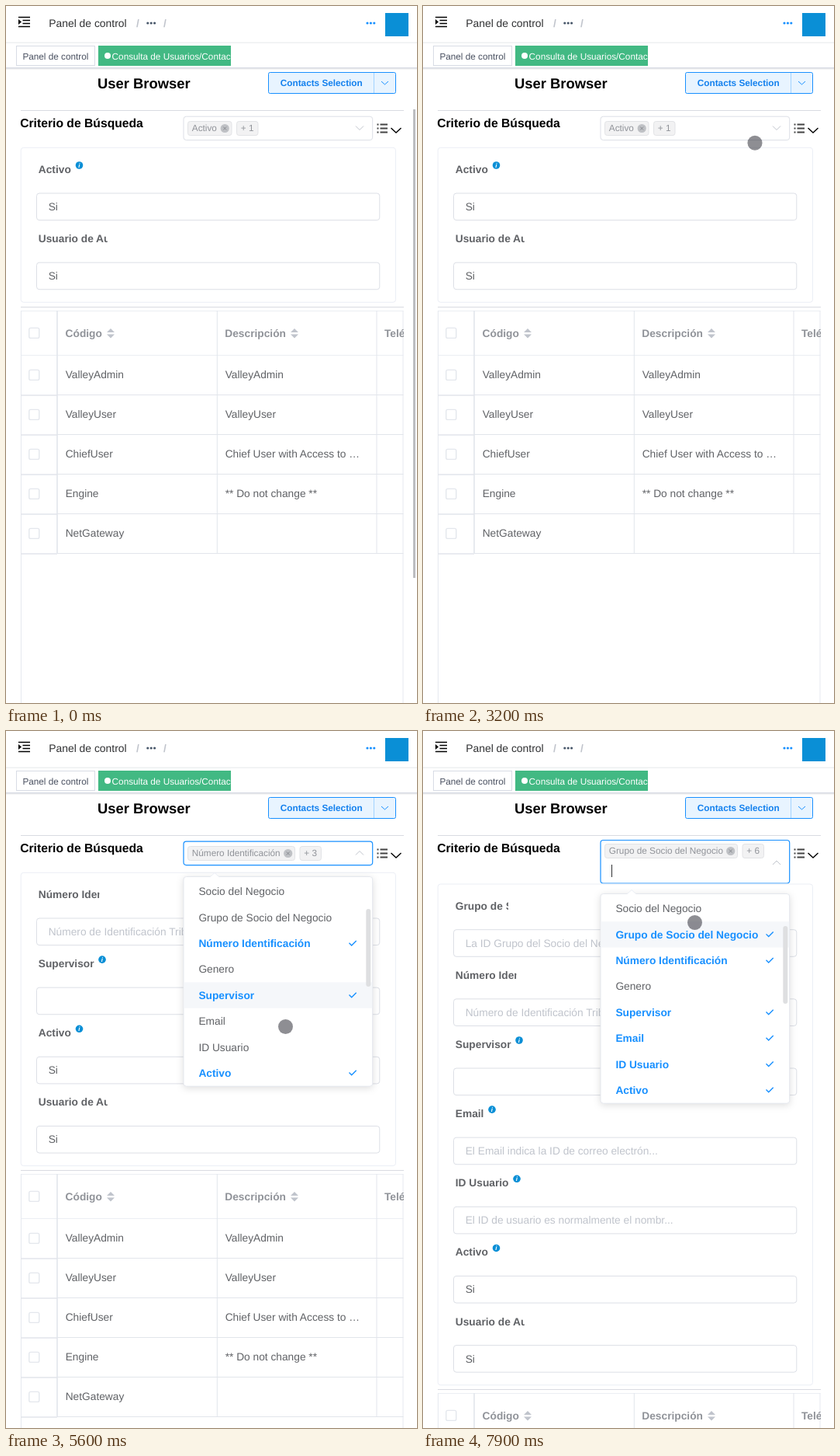
These frames come from a looping animation (530x897 px, 8 s). An HTML page:

```html
<!DOCTYPE html>
<html lang="es">
<head>
<meta charset="utf-8">
<title>User Browser</title>
<style>
  html, body { margin: 0; width: 100%; height: 100%; overflow: hidden; background: #fff; }
  #stage { display: block; width: 530px; height: 897px; }
  text { font-family: "Liberation Sans", Arial, sans-serif; text-rendering: geometricPrecision; white-space: pre; }
  .menu { filter: drop-shadow(0 2px 5px rgba(0, 0, 0, .13)); }
</style>
</head>
<body>
<svg id="stage" viewBox="0 0 530 897"></svg>
<script>
const LOOP = 8000, STEP = 100;
const BLUE = '#1890ff', GRAY = '#606266', MUTED = '#909399', PALE = '#c0c4cc', EDGE = '#dcdfe6', LINE = '#e2e5eb';
const BODY = 13.74, SMALL = 11.78;
const FIELD_PITCH = 89.15, OPTION_PITCH = 33.37;
const OPEN_AT = 3400;

// Form fields in order; "at" is the moment each one is picked in the menu.
const fields = [
  { name: 'Grupo de Socio del Negocio', at: 7800, clip: 68.5, tag: 172, hint: 'La ID Grupo del Socio del Negocio' },
  { name: 'Número Identificación', at: 4500, clip: 79, tag: 139, hint: 'Número de Identificación Tributaria' },
  { name: 'Supervisor', at: 5100, tip: 124, hint: '' },
  { name: 'Email', at: 5800, tip: 89, hint: 'El Email indica la ID de correo electrón...' },
  { name: 'ID Usuario', at: 6600, tip: 121, hint: 'El ID de usuario es normalmente el nombr...' },
  { name: 'Activo', at: 0, tip: 94.5, tag: 57.5, value: 'Si' },
  { name: 'Usuario de Auditoría', at: 0, clip: 89.5, value: 'Si' }
];
const options = ['Socio del Negocio', 'Grupo de Socio del Negocio', 'Número Identificación', 'Genero',
  'Supervisor', 'Email', 'ID Usuario', 'Activo'];
const rows = [
  ['ValleyAdmin', 'ValleyAdmin'], ['ValleyUser', 'ValleyUser'],
  ['ChiefUser', 'Chief User with Access to …'], ['Engine', '** Do not change **'], ['NetGateway', '']
];

const pointerPath = [
  [500, 482, 261], [600, 447, 231], [700, 423.5, 241.5], [2900, 423.5, 241.5],
  [3000, 435, 190], [3300, 424.5, 169.5], [3900, 424.5, 169.5], [4300, 358, 275],
  [4500, 358, 275], [4900, 360, 342], [5100, 360, 342], [5600, 360.5, 380.5],
  [5800, 360.5, 380.5], [6300, 366, 402], [6900, 366, 402], [7000, 365.5, 351.5],
  [7300, 352, 272], [7600, 350.5, 246.5]
];
const scrollPath = [[1200, 0], [1300, 51], [1400, 90], [1500, 104], [1700, 104], [1800, 53], [1900, 14], [2000, 0]];
const thumbFade = [[2200, 1], [2300, .6], [2400, .2], [2600, .2], [2700, 0]];

function sample(keys, t) {
  const next = keys.findIndex(k => k[0] > t);
  if (next < 0) return keys[keys.length - 1].slice(1);
  if (next === 0) return keys[0].slice(1);
  const a = keys[next - 1], b = keys[next], p = (t - a[0]) / (b[0] - a[0]);
  return a.slice(1).map((v, i) => v + (b[i + 1] - v) * p);
}

const text = (x, y, s, fill = GRAY, size = BODY, bold = false) =>
  `<text x="${x}" y="${y}" fill="${fill}" font-size="${size}"${bold ? ' font-weight="bold"' : ''}>${s}</text>`;
const rect = (x, y, w, h, fill, stroke = 'none', r = 0, sw = 1) =>
  `<rect x="${x}" y="${y}" width="${w}" height="${h}" rx="${r}" fill="${fill}" stroke="${stroke}" stroke-width="${sw}"/>`;
const path = (d, stroke, w = 1, fill = 'none') => `<path d="${d}" stroke="${stroke}" stroke-width="${w}" fill="${fill}"/>`;
const circle = (x, y, r, fill) => `<circle cx="${x}" cy="${y}" r="${r}" fill="${fill}"/>`;
const dots = (x, y, gap, r, fill) => [0, 1, 2].map(i => circle(x + i * gap, y, r, fill)).join('');
const clip = (x, y, w, h, inner) =>
  `<svg x="${x}" y="${y}" width="${w}" height="${h}" viewBox="${x} ${y} ${w} ${h}">${inner}</svg>`;

function header() {
  return path('M16 14.5H31M21.5 18.5H31M21.5 22.5H31M16 26.5H31', '#000', 1.5) +
    path('M16 17L20 20.5L16 24Z', 'none', 0, '#000') +
    text(55.2, 27, 'Panel de control', '#303133', 13.9) +
    text(168, 27, '/', PALE, BODY, true) + text(203, 27, '/', PALE, BODY, true) +
    dots(182.8, 22, 4.4, 1.6, '#48576a') + dots(466, 22, 4.4, 1.6, BLUE) +
    rect(489, 9, 30, 30, '#0a8fd6') +
    rect(0, 46.5, 530, 1.5, '#eef0f2') +
    rect(0, 79, 530, 1, '#d8dce5') + rect(0, 80, 530, 1, '#e4e5e8') + rect(0, 81, 530, 1, '#f4f4f5') +
    rect(13.5, 51.5, 101, 25, '#fff', '#d8dce5') + text(21.4, 69, 'Panel de control', '#495060', SMALL) +
    rect(119, 51, 171, 26, '#42b983') + circle(131, 64, 4, '#fff') +
    clip(119, 51, 171, 26, text(136.6, 69, 'Consulta de Usuarios/Contactos', '#fff', SMALL)) +
    text(118, 106.3, 'User Browser', '#000', 18.4, true) +
    rect(338.5, 85.5, 164, 27, '#e8f4ff', BLUE, 2) + path('M474.5 86V112', '#a3d3ff') +
    text(353.8, 103, 'Contacts Selection', '#1380ee', SMALL, true) +
    path('M484 97L488.5 101L493 97', BLUE);
}

function tagBox(x, y, w, label) {
  return rect(x + .5, y + .5, w - 1, 18, '#f2f2f3', '#e2e3e6', 3) + text(x + 5.8, y + 13.3, label, MUTED, SMALL);
}

function select(picked, open, tall, caret) {
  const first = picked[0], tagY = tall ? 145 : 148, y = tagY + 9.5;
  const closeX = 234 + first.tag - 9.3, moreX = 234 + first.tag + 5.5;
  const caretX = tall ? 243.5 : moreX + 43.5, caretY = tall ? 172 : 149, arrowY = tall ? 169.5 : 157;
  const bend = open ? -2.5 : 2.5;
  return rect(229, tall ? 140.5 : 142.2, 243.7, tall ? 55.5 : 30.4, '#fff', open ? BLUE : EDGE, 3.5, open ? 1.2 : 1) +
    tagBox(234, tagY, first.tag, first.name) + circle(closeX, y, 5.6, '#bfc1c5') +
    path(`M${closeX - 2} ${y - 2}l4 4m0 -4l-4 4`, '#85888e') +
    tagBox(moreX, tagY, 28.5, '+ ' + (picked.length - 1)) +
    path(`M451 ${arrowY - bend}L456 ${arrowY + bend}L461 ${arrowY - bend}`, PALE) +
    (caret ? path(`M${caretX} ${caretY}v16`, '#303133') : '');
}

function field(f, y) {
  const label = text(41.8, y + 33, f.name, GRAY, BODY, true);
  return (f.clip ? clip(41.5, y + 18, f.clip, 22, label) : label) +
    (f.tip ? circle(f.tip, y + 23, 4.8, '#0a8fd6') +
      `<text x="${f.tip - 1.3}" y="${y + 26}" fill="#fff" font-size="8" font-weight="bold" font-style="italic">i</text>` : '') +
    rect(39.5, y + 59, 442.3, 34.6, '#fff', EDGE, 3.5) +
    text(54.7, y + 81, f.value || f.hint, f.value ? GRAY : PALE);
}

function table(top) {
  const box = y => rect(29.8, y - 6.6, 13, 13, '#fff', '#e4e7ed', 2, 1.4);
  const sorter = x => path(`M${x - 5} ${top + 28}h10l-5 -5zM${x - 5} ${top + 30.5}h10l-5 5z`, 'none', 0, PALE);
  const heading = (x, s) => text(x, top + 34, s, MUTED, BODY, true);
  let out = path(`M19 ${top + .5}H512.5M19 ${top + 57.5}H512.5`, '#ebeef3') +
    path(`M19.5 ${top}V1100M512 ${top}V1100`, '#e6e9ef') +
    path(`M66 ${top}v312`, LINE, 1.6) + path(`M272.3 ${top}v312M478 ${top}v312`, LINE) +
    box(top + 29) + heading(76.6, 'Código') + sorter(135) + heading(282.3, 'Descripción') + sorter(372) + heading(488, 'Teléfono');
  rows.forEach(([code, description], i) => {
    const y = top + 57 + 51 * i;
    out += box(y + 26) + text(76.7, y + 30, code) + text(282.7, y + 30, description) +
      path(`M66 ${y + 51.5}H512.5`, LINE) + path(`M19 ${y + 52}H66`, LINE, 1.4);
  });
  return clip(18, top, 495, 1000, out);
}

function menu(t, shift) {
  const p = 1 - (1 - Math.min(1, (t - OPEN_AT) / 400)) ** 3;
  const chosen = name => fields.some(f => f.name === name && t >= f.at);
  const touched = fields.filter(f => f.at && t >= f.at).sort((a, b) => b.at - a.at)[0];
  let out = `<g class="menu">${rect(229, 187.5, 243.7, 269.7, '#fff', '#e4e7ed', 3.5)}</g>` +
    path('M263 188L269 182.5L275 188', '#ebeef5', 1, '#fff');
  options.forEach((name, i) => {
    const y = 206.6 + OPTION_PITCH * i, on = chosen(name);
    if (touched && touched.name === name) out += rect(229.6, y - 16.7, 242.6, 33.3, '#f5f7fa');
    out += text(248.4, y + 4.7, name, on ? BLUE : GRAY, BODY, on);
    if (on) out += path(`M442.5 ${y - .6}l3.2 3.2l6 -6`, BLUE, 1.4);
  });
  if (touched) out += rect(464.3, 229, 6, 100, '#dedfe1', 'none', 3);
  return `<g opacity="${p}" transform="translate(0 ${187 * (1 - p) + shift}) scale(1 ${p})">${out}</g>`;
}

function pointer(t) {
  if (t < 500 || (t >= 2700 && t < 3000)) return '';
  const [x, y] = sample(pointerPath, t);
  return circle(x, y, 9.5, 'rgba(50,50,58,.55)');
}

function draw(t) {
  const picked = fields.filter(f => t >= f.at);
  const shown = fields.filter(f => !f.at || t >= f.at + STEP);
  const open = t > OPEN_AT, tall = t >= 7800;
  const lastTap = Math.max(3500, ...picked.map(f => f.at));
  const caret = t >= 3500 && (t - lastTap) % 1000 < 500;
  const [scroll] = sample(scrollPath, t), [thumb] = sample(thumbFade, t);

  const panelY = 182 + (tall ? 14.7 : 0);
  const grow = panelY - 182 + (shown.length - 2) * FIELD_PITCH;
  const below = Math.round(grow);
  const page = path('M19 134.5H513', '#d9dbe1') + text(18.2, 156, 'Criterio de Búsqueda', '#000', 15.7, true) +
    select(picked, open, tall, caret) +
    path('M482.5 152.5H492M482.5 157.5H492M482.5 162.5H492M478.5 152.5h2M478.5 157.5h2M478.5 162.5h2', '#444', 2) +
    path('M496.5 157L503 163L509.5 157', '#000', 1.4) +
    rect(19.2, panelY + .3, 483.3, 199 + (shown.length - 2) * FIELD_PITCH, '#fff', '#ebeef5', 3.5) +
    shown.map((f, i) => field(f, panelY + FIELD_PITCH * i)).join('') +
    path(`M19 ${387.5 + below}H513`, '#d9dbe1') + table(392 + below);

  return header() +
    clip(0, 129, 530, 768, `<g transform="translate(0 ${-scroll})">${page}</g>`) +
    (thumb ? `<g opacity="${thumb}">${rect(525, 133 + scroll * 40 / 51, 3, 603, '#bcbdc0')}</g>` : '') +
    (open ? menu(t, tall ? 22 : 0) : '') + pointer(t);
}

const stage = document.getElementById('stage');
let shownTime = -1;
function tick() {
  const t = Math.floor(performance.now() % LOOP / STEP) * STEP;
  if (t !== shownTime) stage.innerHTML = draw(shownTime = t);
  requestAnimationFrame(tick);
}
tick();
</script>
</body>
</html>
```
